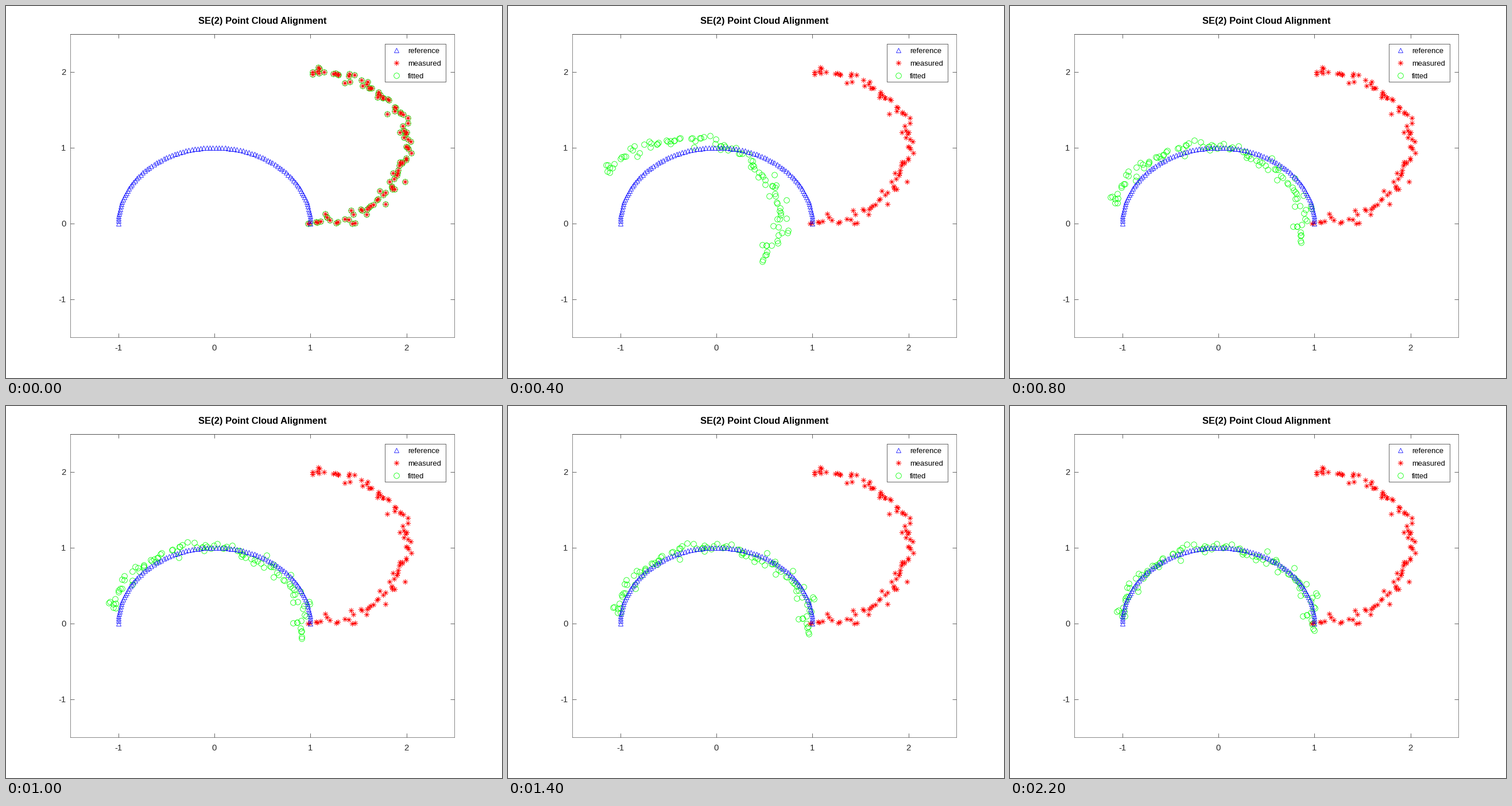
Animation of 864 by 648 pixels, one loop 3200 ms. Source, as a matplotlib script:

```python
import numpy as np
import matplotlib.pyplot as plt
from matplotlib.animation import FuncAnimation
from matplotlib.patches import Rectangle

W, H, DPI = 864, 648, 100
PT = 72 / DPI  # points per pixel
LEFT, RIGHT, TOP, BOTTOM = 112, 781.4, 48.5, 576.5  # plot box in pixels
LOW, HIGH = -1.5, 2.5
TICKS = range(-1, 3)
BLUE, RED, GREEN, INK = "#0000ff", "#ff0000", "#00ff00", "#262626"
FRAMES, STEP, LAST = 16, 200, 11
PIVOT = np.array([1.627, 1.036])

plt.rcParams["font.family"] = "Liberation Sans"

# Upper half circle, and a noisy copy turned by -90 degrees and moved by (1, 1)
theta = np.linspace(0, np.pi, 100)
reference = np.column_stack([np.cos(theta), np.sin(theta)])
noise = np.random.default_rng(4).normal(0, 0.043, reference.shape)
measured = 1 + reference[:, ::-1] * (1, -1) + noise


def fit(step):
    """Cloud after some iterations: centres meet at once, the turn eases in."""
    if step == 0:
        return measured
    u = step - 1.5
    left = min(90, 75 / (u + np.hypot(u, 1.56)))  # degrees still to turn
    a = np.radians(90 - left)
    turn = np.array([[np.cos(a), -np.sin(a)], [np.sin(a), np.cos(a)]])
    return (measured - PIVOT) @ turn.T + reference.mean(axis=0)


def marks(ax, points, style, **kw):
    _, marker, color, size, width = style
    return ax.plot(*np.transpose(points), ls="none", marker=marker,
                   ms=size * PT, mfc="none", mec=color, mew=width * PT,
                   **kw)[0]


def label(x, y, text, px, ha="left", color="black", **kw):
    overlay.text(x, y, text, fontsize=px * PT, ha=ha, va="baseline",
                 color=color, **kw)


fig = plt.figure(figsize=(W / DPI, H / DPI), dpi=DPI, facecolor="white")
ax = fig.add_axes([LEFT / W, 1 - BOTTOM / H,
                   (RIGHT - LEFT) / W, (BOTTOM - TOP) / H])
ax.set(xlim=(LOW, HIGH), ylim=(LOW, HIGH), xticks=TICKS, yticks=TICKS)
ax.tick_params(direction="in", top=True, right=True, length=7 * PT,
               width=0.7 * PT, color=INK, labelleft=False, labelbottom=False)
for side, spine in ax.spines.items():
    spine.set(linewidth=(0.8 if side == "top" else 0.55) * PT, edgecolor=INK)

STYLES = [("reference", "^", BLUE, 8.6, 0.75),
          ("measured", (8, 2, 0), RED, 9.4, 0.55),
          ("fitted", "o", GREEN, 9.6, 0.8)]
lines = [marks(ax, cloud, style, zorder=5 - i)
         for i, (cloud, style) in enumerate(zip((reference, measured, fit(0)),
                                                STYLES))]
fitted = lines[-1]

# Overlay in pixels for the title, tick labels and legend
overlay = fig.add_axes([0, 0, 1, 1])
overlay.set(xlim=(0, W), ylim=(H, 0))
overlay.axis("off")

label(447, 30.5, "SE(2) Point Cloud Alignment", 16.46, "center",
      weight="bold")
for v in TICKS:
    part = (v - LOW) / (HIGH - LOW)
    label(LEFT + part * (RIGHT - LEFT), 600, str(v), 14.8, "center", INK)
    label(104.5, BOTTOM - part * (BOTTOM - TOP) + 5.3, str(v), 14.8,
          "right", INK)

overlay.add_patch(Rectangle((659.5, 65.5), 106, 66, fc="white", ec=INK,
                            lw=0.7 * PT))
for i, style in enumerate(STYLES):
    y = 76.8 + 22 * i
    marks(overlay, [(680.3, y)], style)
    label(700, y + 4.7, style[0], 13.05)


def update(n):
    fitted.set_data(*fit(min(n, LAST)).T)
    return (fitted,)


anim = FuncAnimation(fig, update, frames=FRAMES, interval=STEP, repeat=True,
                     repeat_delay=0, blit=False)
plt.show()
```
